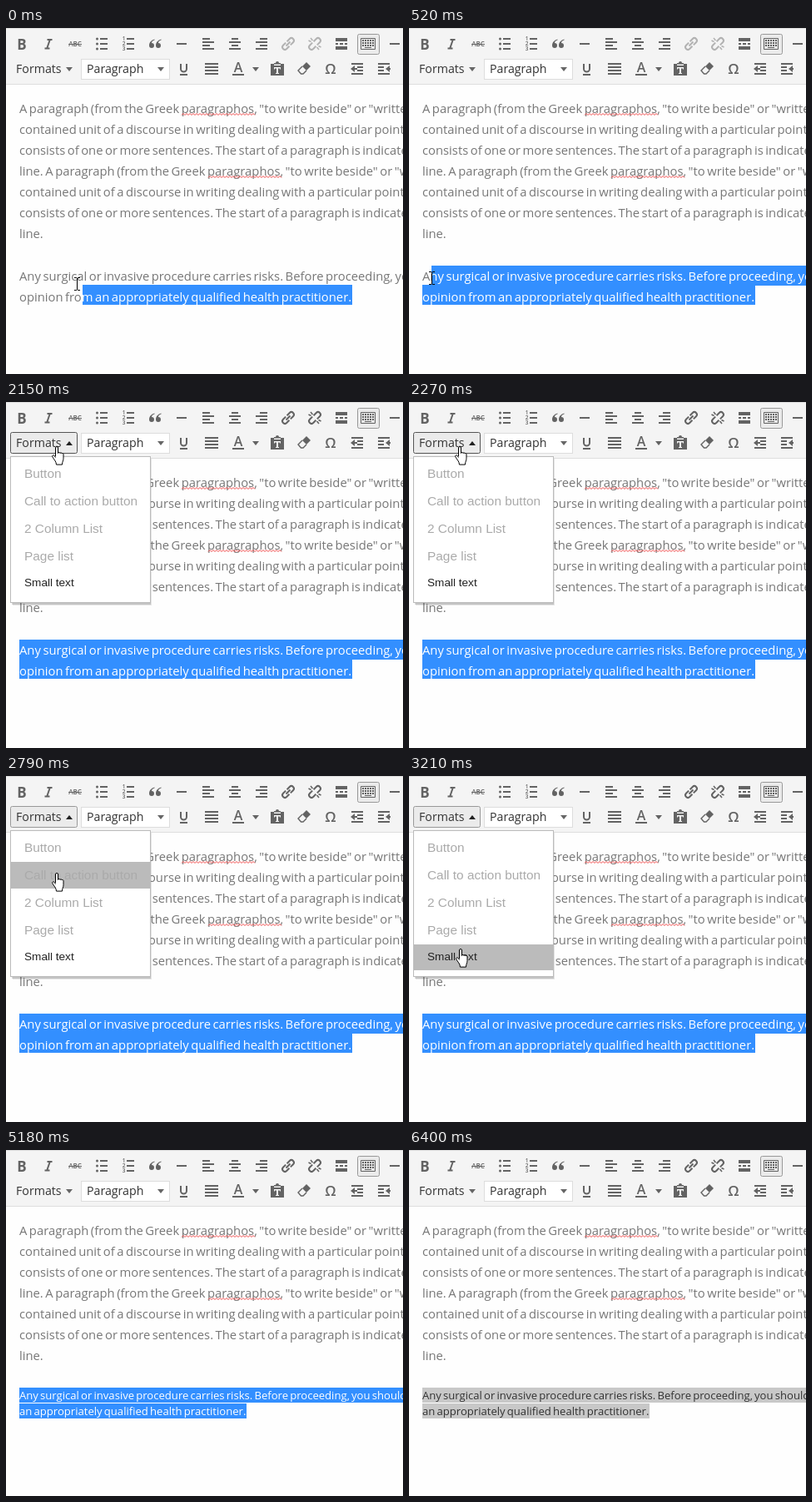
An HTML page that plays this animation: 477x415 px, repeating every 6600 ms.

```html
<!DOCTYPE html>
<html lang="en">
<head>
<meta charset="utf-8">
<title>Editor formats</title>
<style>
html, body { margin: 0; width: 100%; height: 100%; overflow: hidden; background: #fefefe; }
svg { display: block; }
text { white-space: pre; }
.ui { font: 14.2px "Open Sans", sans-serif; fill: #333; }
.body { font: 14.8px "Open Sans", sans-serif; word-spacing: -1.35px; fill: #777; }
.small { font-size: 13.1px; word-spacing: -1.25px; }
.menu { font: 15.4px "Liberation Sans", Arial, sans-serif; fill: #aaa; }
.icon { font-family: "Open Sans", sans-serif; fill: #636363; }
.line { fill: none; stroke: #636363; stroke-width: 2; }
.off { opacity: .45; }
</style>
</head>
<body>
<svg id="stage" width="477" height="415" viewBox="0 0 477 415">
  <defs><clipPath id="clip"><path id="clipShape"/></clipPath></defs>
  <rect width="477" height="67" fill="#f4f4f4"/>
  <path d="M0 .5H477M0 67.5H477" stroke="#dedede"/>
  <rect x="422.5" y="7.5" width="26" height="24" rx="2" fill="#ebebeb" stroke="#999"/>
  <rect x="90.5" y="37.5" width="106" height="24" fill="#fff" stroke="#ddd"/>
  <g id="icons"></g>
  <rect id="button" x="5.5" y="36.5" width="80" height="25" rx="2"/>
  <text class="ui" x="12" y="54">Formats</text>
  <text class="ui" x="97" y="54">Paragraph</text>
  <path id="arrow"/>
  <path d="M182 47h8l-4 5z" fill="#666"/>
  <g id="article" class="body"></g>
  <path id="squiggles" fill="none" stroke="#f04848"/>
  <g id="plain" class="body"></g>
  <path id="selection"/>
  <g clip-path="url(#clip)"><g id="picked" class="body"></g></g>
  <g id="menu">
    <rect x="8" y="68" width="167" height="176" fill="#000" opacity=".1"/>
    <rect x="7" y="67" width="167" height="176" fill="#000" opacity=".14"/>
    <rect x="5.5" y="65.5" width="168" height="175" fill="#fff" stroke="#bbb"/>
    <rect id="hover" x="6" width="167" fill="#bbb"/>
    <g id="items" class="menu"></g>
  </g>
  <path id="beam" fill="none" stroke="#000" d="M-3.5-7.5H-.5M.5-7.5H3.5M0-7V7M-3.5 7.5H-.5M.5 7.5H3.5"/>
  <path id="hand" fill="#fff" stroke="#000" d="M4.5 12V2a1.5 1.5 0 0 1 3 0v6.500c0-1.500 2.500-1.300 2.500 0 0-1.100 2.200-.8 2.200.5 0-.9 1.800-.6 1.800.6v5c0 3-1.500 4-1.500 7.500h-7C5.500 18 2 15.500.8 12.600c-.6-1.600 1.300-2.400 2.300-1.200L4.500 13.500"/>
</svg>
<script>
const LOOP = 6600;
const $ = id => document.getElementById(id);
const set = (el, attrs) => Object.entries(attrs).forEach(([k, v]) => el.setAttribute(k, v));
const show = (el, on) => set(el, { visibility: on ? 'visible' : 'hidden' });
const fill = d => `<path d="${d}"/>`;
const line = (d, width = 2) => `<path class="line" style="stroke-width:${width}" d="${d}"/>`;
const glyph = (s, size, x, y, weight = 400) =>
  `<text x="${x}" y="${y}" font-size="${size}" font-weight="${weight}" text-anchor="middle">${s}</text>`;

// Icons live in a 20 x 20 box placed by its centre.
const bars = rows => line(rows.map(([x, w], i) => `M${x} ${4 + i * 4}h${w}`).join(''));
const full = [3, 14];
const rule = fill('M4 9h12v2H4z');
const chain = `<g transform="rotate(-45 10 10)">${
  line('M9 7H4.500a3 3 0 0 0 0 6H9M11 7h4.500a3 3 0 0 1 0 6H11')}`;
const quote = 'c-4 1-6.500 4-6.500 7.500a3 3 0 1 0 3-3c0-1.800 1.500-2.800 3.500-3.500z';
const shift = bars([full, [10, 7], [10, 7], full]);

const icons = [
  [19, 19, glyph('B', 17, 10, 16.5, 700)],
  [51, 19, line('M8.500 5h6M5.500 15.500h6M11.800 5l-3.600 10.500')],
  [83, 19, glyph('ABC', 8, 10, 13, 600) + line('M2 10.500h16', 1)],
  [115, 19, fill([4, 10, 16].map(y => `M3 ${y}a1.500 1.500 0 1 0 3 0a1.500 1.500 0 1 0-3 0`).join(''))
    + line('M8 4h9M8 10h9M8 16h9')],
  [147, 19, [1, 2, 3].map(n => glyph(n, 6.5, 4.5, n * 6, 600)).join('') + line('M8 4h9M8 10h9M8 16h9')],
  [179, 19, fill(`M9.500 4.500${quote}M17.500 4.500${quote}`)],
  [211, 19, rule],
  [243, 19, bars([[3, 9], full, [3, 9], full])],
  [275, 19, bars([[6, 8], full, [6, 8], full])],
  [307, 19, bars([[8, 9], full, [8, 9], full])],
  [339, 19, `<g class="link">${chain}${line('M6.500 10h7')}</g></g>`],
  [371, 19, `<g class="link">${chain}</g>${line('M5 3l2.500 3M2.500 6l3 1.500M15 17l-2.500-3M17.500 14l-3-1.500', 1.5)}</g>`],
  [403, 19, fill('M3 3h14v4H3zM3 9h3v2H3zM8 9h4v2H8zM14 9h3v2h-3zM3 13h14v4H3z')],
  [435, 19, line('M1.500 3.500h17v13h-17z', 1)
    + '<g stroke-dasharray="2 1">' + line('M3 6h14M3 9h14M3 12h14') + '</g>' + line('M6 14.500h8', 1)],
  [467, 19, rule],
  [214, 49, line('M6 4v6a3.500 3.500 0 0 0 7 0V4M5 17h9')],
  [247, 49, bars([[2, 16], [2, 16], [2, 16], [2, 16]])],
  [279, 49, glyph('A', 16, 10, 14, 600) + line('M3 17h14') + fill('M27 8h8l-4 5z')],
  [326, 49, fill('M2 4h4V3h2a2 2 0 0 1 4 0h2v1h4v14H2z')
    + '<path fill="#f4f4f4" d="M6 4.500h8V6H6zM6 8h8v2.500h-1V9.500h-2V15h1v1H8v-1h1V9.500H7v1H6z"/>'],
  [358, 49, fill('M8 7l5-5 5 5-5 5z') + line('M8 7l-5 5 3.500 4H9l4-4', 1.4)],
  [390, 49, glyph('Ω', 17, 10, 16, 600)],
  [422, 49, shift + fill('M7 6v8l-5-4z') + line('M6 10h4')],
  [454, 49, bars([full, [3, 7], [3, 7], full]) + fill('M12 10l5-4v8z') + line('M14 10h4')],
];
$('icons').innerHTML = icons.map(([x, y, art]) =>
  `<g class="icon" transform="translate(${x - 10} ${y - 10})">${art}</g>`).join('');

const textLine = (s, x, y, cls = '') => `<text class="${cls}" x="${x}" y="${y}">${s}</text>`;
const unit = [
  'contained unit of a discourse in writing dealing with a particular point',
  'consists of one or more sentences. The start of a paragraph is indicated',
];
const greek = 'A paragraph (from the Greek paragraphos, "to write beside" or "written';
$('article').innerHTML = [greek, ...unit, 'line. ' + greek, ...unit, 'line.']
  .map((s, i) => textLine(s, 16, 102 + i * 25)).join('');

const squiggle = (x, y) => `M${x} ${y}` +
  Array.from({ length: 44 }, (_, i) => `l2 ${i % 2 ? 2 : -2}`).join('');
set($('squiggles'), { d: squiggle(211, 104.5) + squiggle(243, 179.5) });

const risk = 'Any surgical or invasive procedure carries risks. Before proceeding, you should';
const advice = 'an appropriately qualified health practitioner.';
const large = textLine(risk, 16, 303) + textLine('opinion from ' + advice, 16, 328);
const small = textLine(risk + ' seek', 16, 299, 'small') + textLine(advice, 16, 318, 'small');

$('items').innerHTML = ['Button', 'Call to action button', '2 Column List', 'Page list']
  .map((s, i) => textLine(s, 22, 91 + i * 33)).join('')
  + '<text x="22" y="221" style="font-size:13.600px;fill:#222">Small text</text>';

// Step tables: [start ms, ...values]
const pointer = [
  [0, 'beam', 85, 307], [120, 'beam', 68, 302], [250, 'beam', 50, 299],
  [390, 'beam', 38, 299], [520, 'beam', 27, 300], [650, 'beam', 19, 301],
  [790, 'beam', 18, 301], [1210, 'beam', 55, 296], [1360, 'beam', 80, 224],
  [1480, 'beam', 74, 130], [1600, 'beam', 62, 77], [1750, 'hand', 62, 59],
  [1880, 'hand', 61, 53], [2670, 'hand', 61, 82], [2790, 'hand', 61, 116],
  [2930, 'hand', 61, 170], [3050, 'hand', 61, 202], [3210, 'hand', 62, 207],
  [3640, 'beam', 60, 208], [4760, 'beam', 187, 248], [4910, 'beam', 330, 290],
  [5030, 'beam', 436, 318], [5180, 'none', 0, 0],
];
const dragStart = [[0, 477], [120, 67], [250, 50], [390, 38], [520, 27], [650, 16]];
const hoverRow = [[0, -1], [2670, 0], [2790, 1], [2930, 3], [3050, -1], [3210, 4]];
const at = (steps, t) => steps.findLast(s => s[0] <= t).slice(1);
const box = (x1, y1, x2, y2) => `M${x1} ${y1}H${x2}V${y2}H${x1}z`;

let shrunkShown = null;

function render(t) {
  const shrunk = t >= 3640;
  const blurred = t >= 6400;
  if (shrunk !== shrunkShown) {
    $('plain').innerHTML = $('picked').innerHTML = shrunk ? small : large;
    shrunkShown = shrunk;
  }

  const [start] = at(dragStart, t);
  const shape = shrunk
    ? box(16, 285, 477, 303) + box(16, 304, 289, 322)
    : (t < 120 ? '' : box(start, 285, 477, 309)) + box(t < 120 ? 92 : 16, 308, 416, 332);
  set($('selection'), { d: shape, fill: blurred ? '#c8c8c8' : '#338fff' });
  set($('clipShape'), { d: shape });
  $('picked').style.fill = blurred ? '#323232' : '#fff';
  document.querySelectorAll('.link').forEach(el => el.classList.toggle('off', t < 1060));

  const open = t >= 2150 && t < 3640;
  const over = t >= 1750 && t < 2670;
  show($('menu'), open);
  show($('button'), over || open);
  set($('button'), { fill: open ? '#ebebeb' : '#fafafa', stroke: open && over ? '#555' : '#999' });
  set($('arrow'), { d: open ? 'M72 52h8l-4-5z' : 'M72 47h8l-4 5z', fill: open ? '#222' : '#666' });
  const [row] = at(hoverRow, t);
  show($('hover'), open && row >= 0);
  set($('hover'), { y: row === 4 ? 202 : 70 + row * 33, height: row === 4 ? 31 : 32 });

  const [kind, x, y] = at(pointer, t);
  show($('beam'), kind === 'beam');
  show($('hand'), kind === 'hand');
  set($('beam'), { transform: `translate(${x + .5} ${y})` });
  set($('hand'), { transform: `translate(${x - 6} ${y})` });
}

const origin = performance.now();
function tick() {
  render((performance.now() - origin) % LOOP);
  requestAnimationFrame(tick);
}
tick();
</script>
</body>
</html>
```
